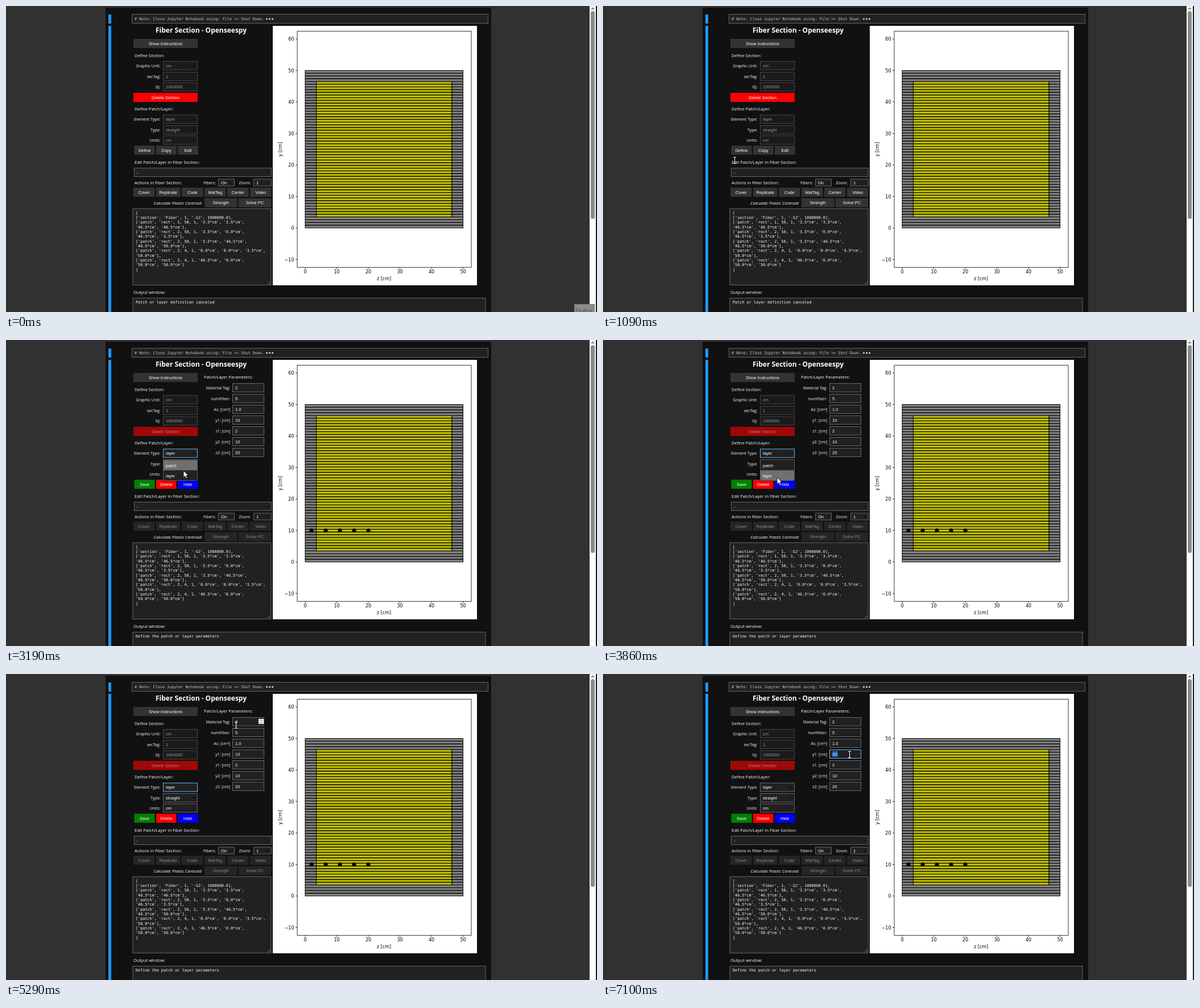
Animation, 1039 px wide and 539 px high, one loop 8000 ms. Source, as an HTML page with a canvas:

```html
<!DOCTYPE html>
<html lang="en">
<head>
<meta charset="utf-8">
<title>Fiber Section</title>
<style>
html, body { margin: 0; width: 100%; height: 100%; overflow: hidden; background: #313131; }
canvas { display: block; width: 1039px; height: 539px; }
</style>
</head>
<body>
<canvas id="stage" width="1039" height="539"></canvas>
<script>
const ctx = document.getElementById('stage').getContext('2d');
const LOOP = 8000;
const UI = '"Open Sans", "Noto Sans", sans-serif';
const LABEL = '7.1px ' + UI;
const HEAD = '7.5px ' + UI;
const ARIAL = '7.5px "Liberation Sans", Arial, sans-serif';
const MONO = '6.78px "DejaVu Sans Mono", monospace';
const PLOT = '8px "DejaVu Sans", sans-serif';

const T = { define: 1860, saved: 2750, open: 2890, hoverLayer: 3660, close: 4010, edit: 6890 };

// time, x, y, pointer kind
const PATH = [
  [360, 1004, 526, 'arrow'], [480, 905, 440, 'arrow'], [640, 600, 330, 'arrow'],
  [800, 310, 296, 'arrow'], [920, 214, 288, 'arrow'], [1010, 226, 277, 'beam'],
  [1090, 231, 272, 'beam'], [1150, 237, 272, 'beam'], [1180, 238, 272, 'beam'],
  [1330, 244, 263, 'hand'], [1560, 249, 255, 'hand'], [1860, 249, 255, 'hand'],
  [1970, 260, 246, 'arrow'], [2210, 286, 225, 'arrow'], [2620, 311, 198, 'arrow'],
  [2920, 311, 198, 'arrow'], [3190, 312, 230, 'arrow'], [3410, 313, 226, 'arrow'],
  [3540, 313, 226, 'arrow'], [3700, 308, 240, 'arrow'], [3860, 306, 242, 'arrow'],
  [4020, 304, 243, 'arrow'], [4180, 270, 258, 'hand'], [4340, 314, 239, 'arrow'],
  [4370, 314, 239, 'arrow'], [4700, 352, 165, 'arrow'], [5050, 402, 91, 'beam'],
  [5230, 402, 91, 'beam'], [5290, 404, 90, 'beam'], [5600, 426, 108, 'beam'],
  [6030, 433, 147, 'beam'], [6060, 433, 146, 'beam'], [6320, 433, 146, 'beam'],
  [6350, 433, 142, 'beam']
];

const CODE = [
  "[",
  "['section', 'Fiber', 1, '-GJ', 1000000.0],",
  "['patch', 'rect', 1, 50, 1, '3.5*cm', '3.5*cm',",
  "'46.5*cm', '46.5*cm'],",
  "['patch', 'rect', 2, 50, 1, '3.5*cm', '0.0*cm',",
  "'46.5*cm', '3.5*cm'],",
  "['patch', 'rect', 2, 50, 1, '3.5*cm', '46.5*cm',",
  "'46.5*cm', '50.0*cm'],",
  "['patch', 'rect', 2, 4, 1, '0.0*cm', '0.0*cm', '3.5*cm',",
  "'50.0*cm'],",
  "['patch', 'rect', 2, 4, 1, '46.5*cm', '0.0*cm',",
  "'50.0*cm', '50.0*cm']",
  "]"
];
const LAYER_CODE = [
  ...CODE.slice(0, 11), CODE[11] + ',',
  "['layer', 'straight', 2, 5, '1.0*cm**2', '10.0*cm',",
  "'2.0*cm', '10.0*cm', '20.0*cm']",
  "]"
];
const PARAMS = [
  ['Material Tag:', '2'], ['numFiber:', '5'], ['As: [cm²]', '1.0'], ['y1: [cm]', '10'],
  ['z1: [cm]', '2'], ['y2: [cm]', '10'], ['z2: [cm]', '20']
];

function rect(x, y, w, h, color) {
  ctx.fillStyle = color;
  ctx.fillRect(x, y, w, h);
}

function frame(x, y, w, h, fill, border) {
  rect(x, y, w, h, fill);
  ctx.strokeStyle = border;
  ctx.lineWidth = 1;
  ctx.strokeRect(x + 0.5, y + 0.5, w - 1, h - 1);
}

// y is the vertical middle of the text
function text(str, x, y, font, color = '#fff', align = 'left') {
  ctx.font = font;
  ctx.fillStyle = color;
  ctx.textAlign = align;
  ctx.fillText(str, x, y + 2.7);
}

function line(points, color, width = 1) {
  ctx.beginPath();
  points.forEach(([x, y]) => ctx.lineTo(x, y));
  ctx.strokeStyle = color;
  ctx.lineWidth = width;
  ctx.stroke();
}

function dot(x, y, r, color) {
  ctx.fillStyle = color;
  ctx.beginPath();
  ctx.arc(x, y, r, 0, 7);
  ctx.fill();
}

function button(label, x, y, w, fill = '#333', dim = false) {
  ctx.globalAlpha = dim ? 0.6 : 1;
  rect(x, y, w, 16, fill);
  text(label, x + w / 2, y + 8, ARIAL, dim ? '#ccc' : '#fff', 'center');
  ctx.globalAlpha = 1;
}

function field(value, x, y, w, opt = {}) {
  const h = opt.h || 16;
  const border = opt.focus ? '#64b5f6' : opt.dim ? '#464646' : '#666';
  frame(x, y, w, h, opt.dim ? '#1b1b1b' : '#212121', border);
  text(value, x + 5, y + h / 2, ARIAL, opt.dim ? '#979797' : '#fff');
  if (opt.select) {
    const cx = x + w - 6.5, cy = y + h / 2;
    line([[cx - 2.5, cy - 1], [cx, cy + 1.5], [cx + 2.5, cy - 1]], '#000');
  }
}

function labelled(label, value, y, opt) {
  text(label, 271.5, y + 8, LABEL, '#fff', 'right');
  field(value, 276, y, 61, opt);
}

const zx = z => 526 + z * 5.55;
const yy = y => 391 - y * 5.55;

function patch(z0, y0, z1, y1, rows, fill) {
  const x = zx(z0), w = zx(z1) - x, h = (yy(y0) - yy(y1)) / rows;
  rect(x, yy(y1), w, h * rows, fill);
  ctx.strokeStyle = '#000';
  ctx.lineWidth = 0.95;
  for (let i = 0; i < rows; i++) ctx.strokeRect(x, yy(y1) + i * h, w, h);
}

function drawPlot(withLayer) {
  rect(469, 35, 359, 457, '#fff');
  patch(3.5, 3.5, 46.5, 46.5, 50, '#bfbf00');
  patch(0, 3.5, 3.5, 46.5, 50, '#808080');
  patch(46.5, 3.5, 50, 46.5, 50, '#808080');
  patch(0, 0, 50, 3.5, 4, '#808080');
  patch(0, 46.5, 50, 50, 4, '#808080');
  if (withLayer) for (let i = 0; i < 5; i++) dot(zx(2 + 4.5 * i), yy(10), 3.6, '#000');

  ctx.strokeStyle = '#000';
  ctx.lineWidth = 0.8;
  ctx.strokeRect(512, 44.3, 306, 416);
  for (let v = -10; v <= 60; v += 10) {
    line([[509, yy(v)], [512, yy(v)]], '#000', 0.8);
    text(String(v).replace('-', '−'), 506.5, yy(v) + 0.3, PLOT, '#000', 'right');
    if (v < 0 || v > 50) continue;
    line([[zx(v), 460.3], [zx(v), 463.3]], '#000', 0.8);
    text(String(v), zx(v), 468.3, PLOT, '#000', 'center');
  }
  text('z [cm]', 664.5, 480, PLOT, '#000', 'center');
  ctx.save();
  ctx.translate(482, 252.5);
  ctx.rotate(-Math.PI / 2);
  text('y [cm]', 0, 0, PLOT, '#000', 'center');
  ctx.restore();
}

function drawPage() {
  rect(0, 0, 1039, 539, '#313131');
  rect(175, 3, 678, 536, '#111');
  rect(180, 15, 5, 16, '#2196f3');
  rect(180, 35, 5, 504, '#2196f3');
  frame(221, 14, 627, 17, '#212121', '#616161');
  text('# Note: Close Jupyter Notebook using: File >> Shut Down.', 226, 22, MONO, '#c4c4c4');
  for (let i = 0; i < 3; i++) dot(458.5 + i * 5, 22.7, 1.5, '#ddd');

  rect(1026, 0, 11, 539, '#fcfcfc');
  rect(1037, 0, 2, 539, '#1a1a1a');
  ctx.fillStyle = '#8b8b8b';
  ctx.beginPath();
  ctx.roundRect(1028, 9, 7, 366, 3.5);
  ctx.moveTo(1031.5, 2);
  ctx.lineTo(1035, 6);
  ctx.lineTo(1028, 6);
  ctx.fill();
}

function drawForm(t) {
  const editing = t >= T.define;
  const off = { dim: true }, offSelect = { dim: true, select: true };
  const choice = { dim: !editing, select: true };

  text('Fiber Section - Openseespy', 343, 44, 'bold 12px ' + UI, '#fff', 'center');
  button('Show Instructions', 224, 58, 113);
  text('Define Section:', 226, 87, HEAD);
  labelled('Graphic Unit:', 'cm', 97, offSelect);
  labelled('secTag:', '1', 116, off);
  labelled('GJ:', '1000000', 134.5, off);
  button('Delete Section', 224, 153, 113, '#f00', editing);

  text('Define Patch/Layer:', 226, 181, HEAD);
  const focus = t >= T.saved && t < T.edit - 30;
  labelled('Element Type:', 'layer', 191.5, { ...choice, focus });
  labelled('Type:', 'straight', 210, choice);
  labelled('Units:', 'cm', 228, choice);
  if (editing) {
    button('Save', 225.5, 246, 36, '#008000');
    button('Delete', 264, 246, 35.5, '#f00');
    button('Hide', 302, 246, 35.5, '#00f');
    if (t < T.saved) {
      ctx.strokeStyle = '#d8e8d8';
      ctx.lineWidth = 1;
      ctx.strokeRect(226, 246.5, 35.5, 15);
    }
  } else {
    ['Define', 'Copy', 'Edit'].forEach((s, i) => button(s, 225.5 + i * 38.2, 246, 36));
  }

  text('Edit Patch/Layer in Fiber Section:', 226, 275, HEAD);
  field('-', 225, 285, 242, { select: true });
  text('Actions in Fiber Section:', 226, 311, HEAD);
  text('Fibers:', 369, 311, LABEL, '#fff', 'right');
  field('On', 373, 304.5, 29, { select: true, h: 13 });
  text('Zoom:', 430.5, 311, LABEL, '#fff', 'right');
  field('1', 435, 304.5, 32, { select: true, h: 13 });

  [['Cover', 224, 37.5], ['Replicate', 264, 42.5], ['Code', 309, 37.5], ['MatTag', 349, 37.5],
   ['Center', 389, 37.5], ['Video', 429, 37.5]]
    .forEach(([s, x, w]) => button(s, x, 320, w, '#333', editing));
  text('Calculate Plastic Centroid:', 345, 347, 'italic 7.5px ' + UI, '#fff', 'right');
  button('Strength', 349, 338.5, 57.5, '#333', editing);
  button('Solve PC', 408.5, 338.5, 58, '#333', editing);

  frame(222.5, 356.5, 244, 135.5, '#212121', '#666');
  const code = editing && t < T.saved ? LAYER_CODE : CODE;
  code.forEach((s, i) => text(s, 228, 363.8 + i * 8.36, MONO));
  line([[460, 490], [465, 485]], '#999', 0.7);
  line([[463, 490], [465, 488]], '#999', 0.7);

  text('Output window:', 224, 504, HEAD);
  frame(222.5, 514, 621, 40, '#212121', '#616161');
  text(t < T.saved ? 'Patch or layer definition canceled' : 'Define the patch or layer parameters',
    228, 521, MONO);
}

function drawParams(t, pointer) {
  text('Patch/Layer Parameters:', 348, 65.5, HEAD);
  PARAMS.forEach(([label, value], i) => {
    const y = 76 + i * 19, focus = i === 3 && t >= T.edit;
    text(label, 394, y + 8, LABEL, '#fff', 'right');
    field(value, 398, y, 56, { focus });
    if (focus) {
      rect(403, y + 3, 10, 10, '#1b5fc1');
      text(value, 403, y + 8, ARIAL);
    }
    const over = pointer && pointer.x > 398 && pointer.x < 454 && pointer.y > y && pointer.y < y + 16;
    if (over && i < 2) {
      rect(444, y + 3, 9, 9, '#f4f4f4');
      line([[446.5, y + 6.5], [448.5, y + 4.7], [450.5, y + 6.5]], '#444', 0.9);
      line([[446.5, y + 8.7], [448.5, y + 10.5], [450.5, y + 8.7]], '#444', 0.9);
    }
  });
}

function drawMenu(t) {
  const over = t < T.hoverLayer ? 0 : 1;
  ctx.save();
  ctx.shadowColor = 'rgba(0,0,0,.6)';
  ctx.shadowBlur = 4;
  ctx.fillStyle = '#212121';
  ctx.beginPath();
  ctx.roundRect(276.5, 210.5, 60, 37, [0, 0, 3, 3]);
  ctx.fill();
  ctx.restore();
  rect(277, 211.5 + over * 18, 59, 18, '#707070');
  ctx.strokeStyle = '#5c5c5c';
  ctx.lineWidth = 1;
  ctx.stroke();
  text('patch', 281, 221, ARIAL);
  text('layer', 281, 239, ARIAL);
}

function pointerAt(t) {
  if (t < PATH[0][0]) return null;
  let i = PATH.length - 1;
  while (PATH[i][0] > t) i--;
  const a = PATH[i], b = PATH[i + 1] || a;
  const k = a === b ? 0 : (t - a[0]) / (b[0] - a[0]);
  return { x: a[1] + (b[1] - a[1]) * k, y: a[2] + (b[2] - a[2]) * k, kind: a[3] };
}

function drawPointer({ x, y, kind }) {
  ctx.save();
  ctx.translate(Math.round(x), Math.round(y));
  if (kind === 'beam') {
    line([[0.5, -5], [0.5, 5]], '#fff');
    line([[-2, -5.5], [3, -5.5]], '#fff');
    line([[-2, 5.5], [3, 5.5]], '#fff');
  } else {
    const shape = kind === 'hand'
      ? 'M-1 1Q0-1 1 1V5L6 6Q7 6 7 8L6 13H-1L-4 8Q-4 6-1 8Z'
      : 'M0 0V12L2.8 9.4 4.8 13.6 6.8 12.7 4.9 8.6H8.6Z';
    const p = new Path2D(shape);
    ctx.fillStyle = '#fff';
    ctx.strokeStyle = '#000';
    ctx.lineWidth = 0.8;
    ctx.fill(p);
    ctx.stroke(p);
  }
  ctx.restore();
}

function drawRecorder(t) {
  if (t >= 90) return;
  ctx.globalAlpha = t < 30 ? 1 : 0.45;
  frame(999, 525, 36, 20, '#8c8c8c', '#777');
  text('Grabar', 1017, 537, '9.5px ' + UI, '#484848', 'center');
  ctx.globalAlpha = 1;
}

function draw(t) {
  const pointer = pointerAt(t);
  drawPage();
  drawPlot(t >= T.saved);
  drawForm(t);
  if (t >= T.define) drawParams(t, pointer);
  if (t >= T.open && t < T.close) drawMenu(t);
  drawRecorder(t);
  if (pointer) drawPointer(pointer);
}

const start = performance.now();
function tick() {
  draw((performance.now() - start) % LOOP);
  requestAnimationFrame(tick);
}
tick();
</script>
</body>
</html>
```
